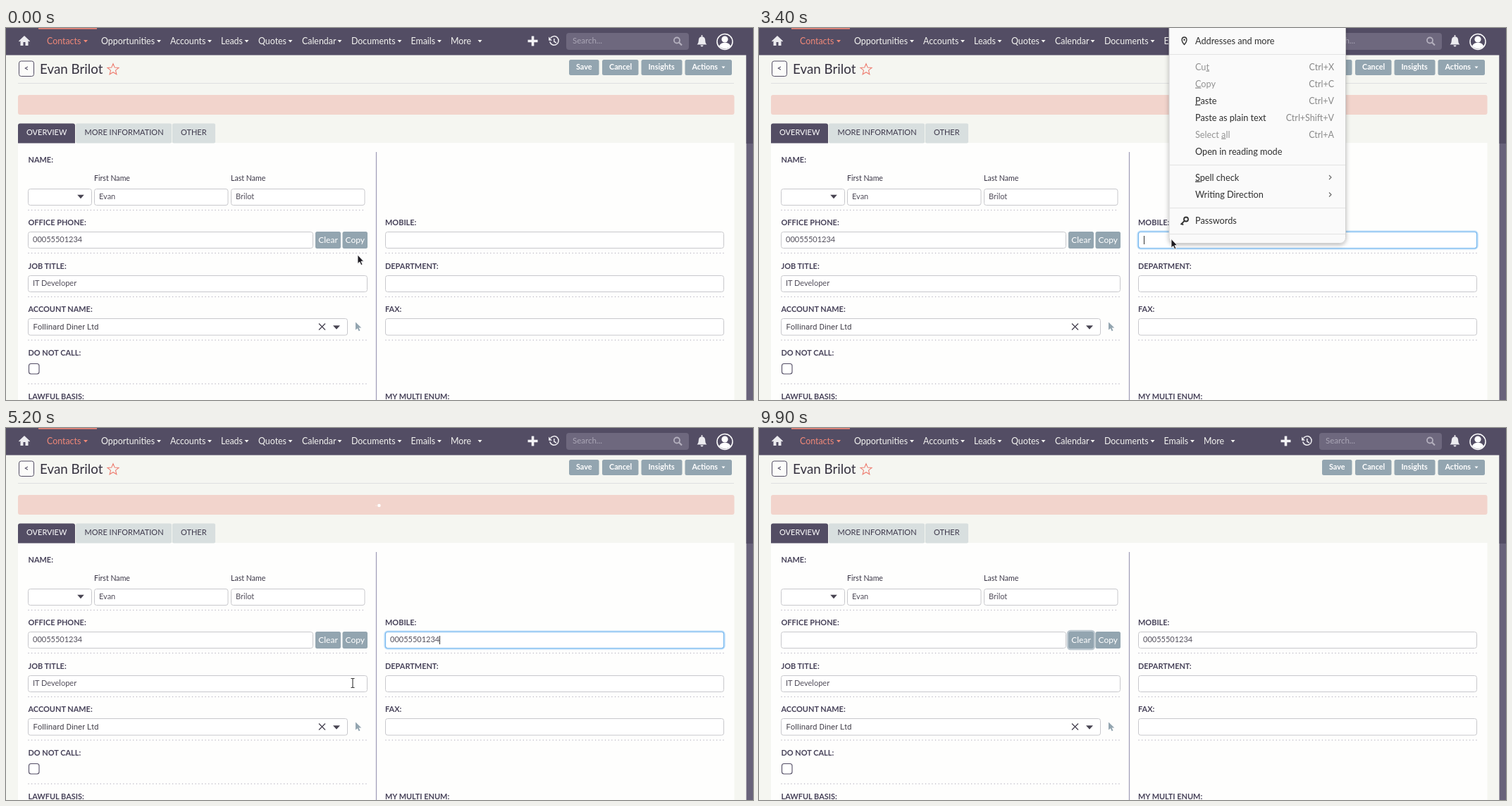
Animation of 1060 by 528 pixels, one loop 10 s. Source, as an HTML page:

```html
<!DOCTYPE html>
<html lang="en">
<head>
<meta charset="utf-8">
<title>Copy and clear phone field</title>
<style>
  html, body { margin: 0; width: 100%; height: 100%; overflow: hidden; background: #f5f6f1; }
  svg { display: block; width: 100vw; height: 100vh; font-family: Lato, "Open Sans", sans-serif; }
  text { white-space: pre; }
  .key { text-decoration: underline; text-decoration-thickness: .8px; }
</style>
</head>
<body>
<svg id="stage" viewBox="0 0 1060 528" preserveAspectRatio="none"></svg>
<script>
const LOOP = 10000;
const INK = '#534d64', STEEL = '#93a5b0', CORAL = '#f08878', PALE = '#f3f3f0';
const FIRST = 'Evan', LAST = 'Brilot', PHONE = '00055501234', ACCOUNT = 'Follinard Diner Ltd';

const rect = (x, y, x2, y2, fill, extra = '') =>
  `<rect x="${x}" y="${y}" width="${x2 - x}" height="${y2 - y}" fill="${fill}" ${extra}/>`;
const text = (x, y, size, str, fill, extra = '') =>
  `<text x="${x}" y="${y}" font-size="${size}" fill="${fill}" ${extra}>${str}</text>`;
const path = (d, fill = 'none', extra = '') => `<path d="${d}" fill="${fill}" ${extra}/>`;
const line = (d, color, width = 1, extra = '') =>
  path(d, 'none', `stroke="${color}" stroke-width="${width}" ${extra}`);
const ring = (x, y, r, color, width) =>
  `<circle cx="${x}" cy="${y}" r="${r}" fill="none" stroke="${color}" stroke-width="${width}"/>`;
const disc = (x, y, r, fill) => `<circle cx="${x}" cy="${y}" r="${r}" fill="${fill}"/>`;
const caretDown = (x, y, w, h, fill) => path(`M${x - w / 2} ${y - h / 2}h${w}l${-w / 2} ${h}z`, fill);

const input = (x, y, x2, y2, value = '') =>
  rect(x + .5, y + .5, x2 - .5, y2 - .5, '#fff', 'rx="3" stroke="#c8c8cc"') +
  text(x + 7, y + 15, 11, value, '#534f5c');
const label = (x, y, str) => text(x, y, 10.95, str, '#474259', 'font-weight="700"');
const dots = (x, x2, y) =>
  line(`M${x + 1} ${y}H${x2}`, '#bbb8c4', 1.5, 'stroke-dasharray="0 4.65" stroke-linecap="round"');
const button = (x, x2, str) =>
  rect(x, 45, x2, 67, STEEL, 'rx="2.5"') +
  text(x + 10, 59.4, 10.8, str, '#fff', 'font-weight="700"');
const fieldButton = (id, x, x2, str) =>
  rect(x - 1, 288, x2 + 1, 314, 'none', `id="${id}Ring" rx="4" stroke="#bdc8d0" stroke-width="2.5"`) +
  rect(x, 289, x2, 313, STEEL, `id="${id}" rx="2.5"`) +
  text((x + x2) / 2, 304.5, 12, str, '#fff', 'text-anchor="middle"');

function navBar() {
  const items = [[58, 'Contacts', 113], [135, 'Opportunities', 217], [233, 'Accounts', 289],
    [305, 'Leads', 341.5], [358, 'Quotes', 403.5], [420, 'Calendar', 473.5],
    [490, 'Documents', 558.5], [574.5, 'Emails', 615], [631, 'More', 672.5]];
  return rect(0, 0, 1060, 38.5, INK) + rect(46, 0, 129, 1.6, CORAL) +
    items.map(([x, name, arrow], i) => {
      const color = i ? PALE : CORAL;
      return text(x, 22.5, 12.4, name, color) + caretDown(arrow, 18.7, 6, 3.4, color);
    }).join('') +
    path('M18 18.5L26 11l8 7.5-1 1-1.5-1.3V25h-4v-5h-3v5h-4v-6.8L19 19.5z', '#ecebef') +
    line('M747.5 11.5v14M740.5 18.5h14', '#f3f3f5', 3.6) +
    line('M772.5 14.5a6.3 6.3 0 1 1-.8 5M777.8 15v4.2l3 1.8', '#ecebef', 1.5) +
    path('M770 12.5v5.2h5z', '#ecebef') +
    rect(795, 7, 969, 31, '#6e687e', 'rx="4"') +
    text(804, 22, 11.5, 'Search...', '#aaa6b6') +
    ring(952, 17.5, 4, '#b4b0be', 1.8) + line('M955 20.5l4 4', '#b4b0be', 2.2) +
    path('M980.5 23.5c2.5-2 2-5 2.5-7.5a4.6 4.6 0 0 1 9 0c.5 2.5 0 5.5 2.5 7.5zM985.5 24.5h4a2 2 0 0 1-4 0zM986.7 10h1.6v3h-1.6z', '#ecebef') +
    ring(1020, 19.5, 11, '#fff', 1.5) + disc(1020, 16, 4.6, '#fff') +
    path('M1012 26c1-7 15-7 16 0a11 11 0 0 1-16 0z', '#fff');
}

function header() {
  const star = Array.from({ length: 10 }, (_, i) => {
    const a = i * Math.PI / 5, r = i % 2 ? 3.7 : 8.4;
    return `${(152 + r * Math.sin(a)).toFixed(1)} ${(59 - r * Math.cos(a)).toFixed(1)}`;
  }).join('L');
  return rect(18.5, 47, 39.5, 68.5, '#fcfcfa', `rx="3" stroke="${INK}"`) +
    text(29, 61, 11, '&lt;', INK, 'text-anchor="middle" font-weight="700"') +
    text(48, 65, 18.8, `${FIRST} ${LAST}`, '#35313f') +
    line(`M${star}z`, '#ee7f72', 1.1) +
    button(799, 841.5, 'Save') + button(846, 897.5, 'Cancel') +
    button(901.5, 959.5, 'Insights') + button(963.5, 1030, 'Actions') +
    caretDown(1018, 56, 5, 3, '#fff') +
    line('M17 78.5H1033', '#dfe0e0') +
    rect(17, 95, 1033.5, 123, '#f2d4cc', 'rx="3"');
}

function tabs() {
  return rect(17, 163, 1033.5, 528, '#fefefd') +
    path('M17 163.5V138.5q0-3 3-3H95q3 0 3 3V163.5z', INK) +
    rect(99, 135.5, 235, 163.5, '#d8dfdf', 'rx="2"') +
    rect(236, 135.5, 297, 163.5, '#d8dfdf', 'rx="2"') +
    text(29, 152, 11, 'OVERVIEW', '#fff') +
    text(111.5, 152, 11, 'MORE INFORMATION', '#3d384b') +
    text(248, 152, 11, 'OTHER', '#3d384b');
}

function form() {
  return line('M525.5 176V528', '#a3a0ba', 1.3) +
    label(31.5, 190.5, 'NAME:') +
    text(125, 217, 10.6, 'First Name', '#3a3646') + text(319, 217, 10.6, 'Last Name', '#3a3646') +
    input(31, 228, 122, 252) + caretDown(106, 239.5, 9.5, 5.5, '#484452') +
    input(125, 228, 315.5, 252, FIRST) + input(319, 228, 509.5, 252, LAST) +
    label(31.5, 280, 'OFFICE PHONE:') + input(31, 289, 436, 313) +
    text(38, 304, 11, PHONE, '#534f5c', 'id="office"') +
    fieldButton('clear', 439, 475, 'Clear') + fieldButton('copy', 477.5, 513, 'Copy') +
    label(31.5, 342, 'JOB TITLE:') + input(31, 351, 513, 375, 'IT Developer') +
    label(31.5, 403, 'ACCOUNT NAME:') + input(31, 412, 485, 436.5) +
    text(38.5, 428.3, 11.5, ACCOUNT, '#45424c', 'font-family="Roboto, sans-serif"') +
    line('M444 419.5l9 9m0-9l-9 9', '#484452', 1.3) + caretDown(469, 425, 10, 5.5, '#484452') +
    path('M496 417.5v11l2.7-2.3 2 4 1.8-.9-2-3.9h3.8z', STEEL) +
    label(31.5, 464.5, 'DO NOT CALL:') +
    rect(32.5, 476.5, 47, 491, '#fff', `rx="3" stroke="${INK}" stroke-width="1.1"`) +
    label(31.5, 527, 'LAWFUL BASIS:') +
    label(538, 280, 'MOBILE:') + input(538, 289, 1019, 313) +
    '<g id="focus">' +
    rect(538.5, 289.5, 1018.5, 312.5, '#fff', 'rx="3.5" stroke="#c3e1fa" stroke-width="4.5"') +
    rect(538.5, 289.5, 1018.5, 312.5, '#fff', 'rx="3" stroke="#79b9ee" stroke-width="1.2"') + '</g>' +
    text(545, 304, 11, PHONE, '#534f5c', 'id="mobile"') +
    line('M0 295V307', '#333', 1, 'id="caret"') +
    label(538, 342, 'DEPARTMENT:') + input(538, 351, 1019, 375) +
    label(538, 403, 'FAX:') + input(538, 412, 1019, 436.5) +
    label(538, 527, 'MY MULTI ENUM:') +
    dots(31, 510, 258.5) + dots(31, 513, 505) +
    [319.5, 381.5, 443].map(y => dots(31, 513, y) + dots(538, 1019, y)).join('');
}

function contextMenu() {
  const key = c => `<tspan class="key">${c}</tspan>`;
  const rows = [[18, 'Addresses and more'], [55, `Cu${key('t')}`, 'Ctrl+X', true],
    [79, `${key('C')}opy`, 'Ctrl+C', true], [103, `${key('P')}aste`, 'Ctrl+V'],
    [127, 'Paste as plain text', 'Ctrl+Shift+V'], [151, `Select ${key('a')}ll`, 'Ctrl+A', true],
    [175, 'Open in reading mode'], [212, `${key('S')}pell check`, '>'],
    [236.5, 'Writing Direction', '>'], [273.5, 'Passwords']];
  return '<g id="menu">' +
    rect(582, -20, 832.5, 305.5, '#fafafa', 'rx="8" stroke="#c9c9c9" stroke-width=".8" filter="url(#shadow)"') +
    [37.5, 194.5, 255.5, 292.5].map(y => line(`M582 ${y}H832`, '#e3e3e3')).join('') +
    rows.map(([y, name, hint, off]) =>
      text(619, y + 4.5, 12.7, name, off ? '#949494' : '#2f2f2f') +
      (hint === '>' ? line(`M809 ${y - 3}l3 3-3 3`, '#666', 1.1)
        : hint ? text(816, y + 4.5, 12.5, hint, '#8a8a8a', 'text-anchor="end"') : '')).join('') +
    line('M603.5 23.5c-5-5.5-4-10.5 0-10.5s5 5 0 10.5z', '#333', 1.4) + disc(603.5, 16.7, 1.2, '#333') +
    ring(606, 271.5, 3, '#333', 1.8) +
    line('M604 273.5l-5.5 5.5m1.5-1.5l2 2', '#333', 1.8) + '</g>';
}

function loaderAndPointers() {
  return [0, 1, 2].map(i => `<circle id="dot${i}" cx="${521 + 4.2 * i}" cy="110" fill="#fff"/>`).join('') +
    '<g id="pointer">' +
    path('M0 0V12.5l2.8-2.5 2.1 4.6 2-.9-2-4.5h3.7z', '#1c1a20', 'id="arrow" stroke="#fff" stroke-width=".8"') +
    path('M-1-1q1.7-1.2 2.5.8V4.5l5.5 1q2 .6 1.9 2.5l-.9 5H1L-2.5 8q0-1.8 1.5-1z', '#2a272d', 'id="hand" stroke="#fff" stroke-width=".8"') +
    line('M-2.5-6.5H-.8L0-5.7.8-6.5H2.5M0-5.7V5.7M-2.5 6.5H-.8L0 5.7.8 6.5H2.5', '#333', 1.1, 'id="beam"') +
    '</g>';
}

const stage = document.getElementById('stage');
stage.innerHTML =
  '<defs><filter id="shadow" x="-10%" y="-10%" width="120%" height="120%">' +
  '<feDropShadow dx="0" dy="2" stdDeviation="3" flood-opacity=".28"/></filter></defs>' +
  rect(0, 0, 1060, 528, '#f5f6f1') + header() + tabs() + form() +
  rect(1050.5, 38, 1060, 528, '#68627a') + rect(1050.5, 38, 1060, 164, INK) +
  navBar() + contextMenu() + loaderAndPointers();

const el = {};
stage.querySelectorAll('[id]').forEach(node => { el[node.id] = node; });
const show = (id, on) => el[id].setAttribute('visibility', on ? 'visible' : 'hidden');
const clamp = v => Math.max(0, Math.min(1, v));
const ease = v => v * v * (3 - 2 * v);

// Pointer stops: time, x, y
const stops = [[0, 499, 322], [250, 380, 334], [500, 99, 304], [650, 100, 302], [1050, 503, 297],
  [1600, 503, 297], [2100, 570, 336], [2700, 582, 305], [3300, 582, 305], [3800, 610.5, 252],
  [4250, 640, 105], [4600, 640, 105], [5200, 492, 362], [5500, 457, 301], [6900, 457, 301],
  [7450, 465, 361], [7850, 465, 361], [8150, 112, 301], [8450, 600, 302], [8800, 1010, 15]];

function pointerAt(t) {
  const i = Math.max(1, stops.findIndex(s => s[0] > t));
  const [t0, x0, y0] = stops[i - 1], [t1, x1, y1] = stops[i];
  const k = ease((t - t0) / (t1 - t0));
  return [x0 + (x1 - x0) * k, y0 + (y1 - y0) * k];
}

function render(t) {
  const moving = t < 8800;
  const [x, y] = moving ? pointerAt(t) : [-50, -50];
  const menuOpen = t >= 3400 && t < 4600;
  const inside = (x0, x1, y0, y1) => !menuOpen && x >= x0 && x <= x1 && y >= y0 && y <= y1;
  const overClear = inside(439, 475, 289, 313), overCopy = inside(477, 513, 289, 313);
  const onButton = overClear || overCopy;
  const onInput = inside(31, 436, 289, 313) || inside(538, 1019, 289, 313) || inside(31, 513, 351, 375);

  el.pointer.setAttribute('transform', `translate(${x.toFixed(1)} ${y.toFixed(1)})`);
  show('hand', moving && onButton);
  show('beam', moving && onInput);
  show('arrow', moving && !onButton && !onInput);
  el.clear.setAttribute('fill', overClear ? '#d98c82' : STEEL);
  el.copy.setAttribute('fill', overCopy ? '#d98c82' : STEEL);

  const focused = t >= 3050 && t < 6800, pasted = t >= 4600;
  show('copyRing', t >= 1400 && t < 3050);
  show('clearRing', t >= 6800);
  show('office', t < 6800);
  show('focus', focused);
  show('caret', focused);
  el.caret.setAttribute('transform', `translate(${pasted ? 615.5 : 546.5} 0)`);
  show('mobile', pasted);
  show('menu', menuOpen);

  // Three loader dots swell and shrink one after another
  const p = (t + 45) % 1140;
  [0, 1, 2].forEach(i => {
    const grow = clamp((p - 45 - 50 * i) / 240);
    const shrink = clamp(1 - (p - 480 - 100 * i) / 140);
    el['dot' + i].setAttribute('r', (2.4 * Math.min(grow, shrink)).toFixed(2));
  });
}

const start = performance.now();
function tick() {
  render((performance.now() - start) % LOOP);
  requestAnimationFrame(tick);
}
tick();
</script>
</body>
</html>
```
